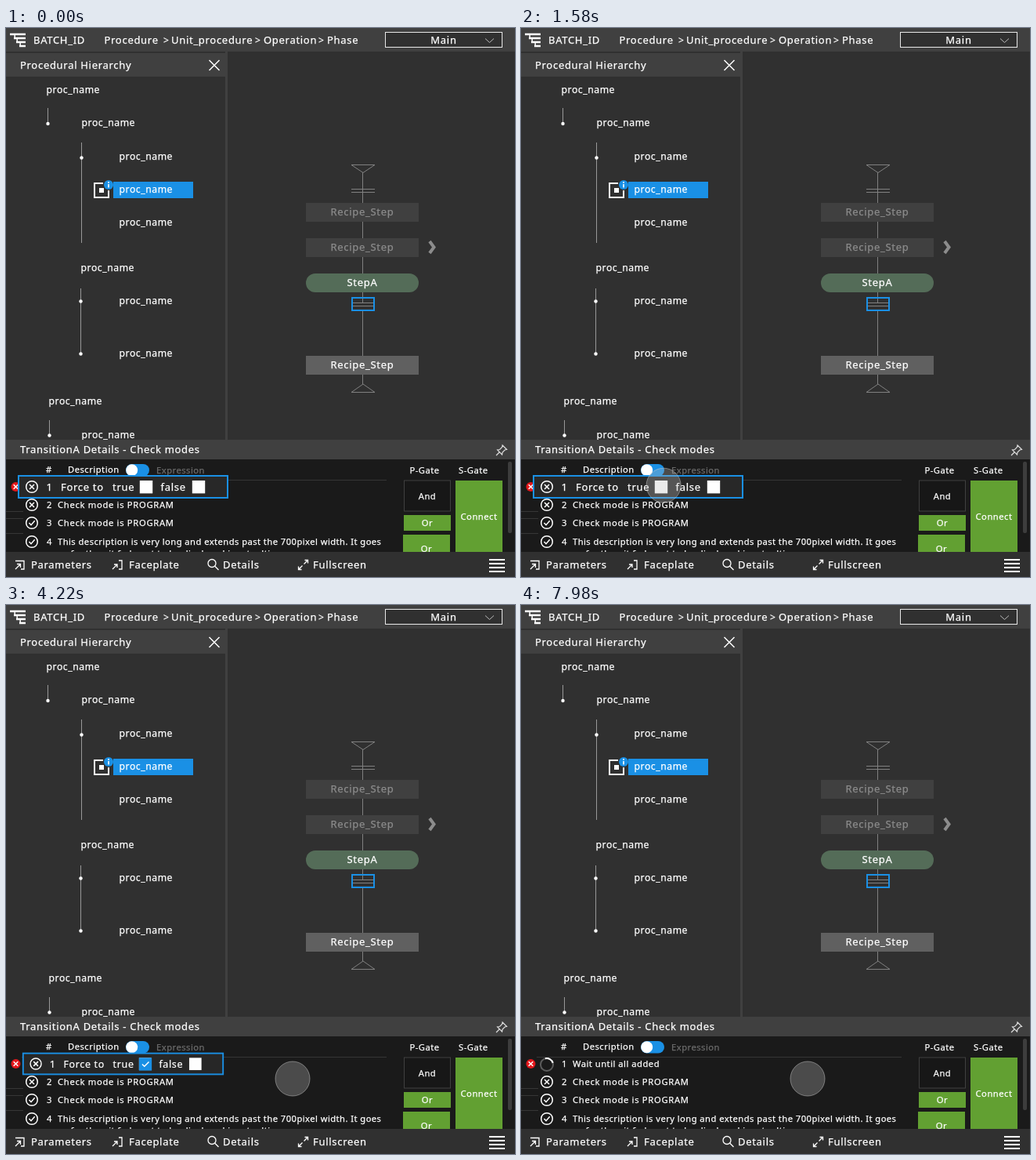
Recreate the animation shown at these times as an HTML page. Size 650 by 700 pixels, loop 8000 ms.

```html
<!DOCTYPE html>
<html lang="en">
<head>
<meta charset="utf-8">
<title>Batch transition details</title>
<style>
  html, body { margin: 0; width: 100%; height: 100%; overflow: hidden; background: #303030; }
  svg { display: block; }
  text {
    font-family: "Noto Sans", "Open Sans", sans-serif;
    font-size: 13px; letter-spacing: .7px;
    fill: #fff; stroke: #fff; stroke-width: .25px;
  }
  .tree text { font-size: 12.2px; letter-spacing: .55px; }
  .small text { font-size: 11.2px; letter-spacing: .5px; }
  .small .row { letter-spacing: .45px; }
  .mid { text-anchor: middle; }
  .dim { fill: #8b8b8b; stroke: #8b8b8b; }
  .faint { fill: #6c6c6c; stroke: #6c6c6c; }
  .line { fill: none; stroke: #fff; stroke-width: 1.5; }
  .flow { fill: none; stroke: #808080; stroke-width: 1; }
  .rule { fill: none; stroke: #363636; }
</style>
</head>
<body>
<svg width="650" height="700" viewBox="0 0 650 700">
  <defs>
    <g id="fail"><circle r="7.3" class="line"/><path d="M-3 -3L3 3M3 -3L-3 3" class="line"/></g>
    <g id="pass"><circle r="7.3" class="line"/><path d="M-3.5 0L-1 2.7L3.7 -2.7" class="line"/></g>
    <clipPath id="list"><path d="M0 550H650V668H0Z"/></clipPath>
    <clipPath id="body"><path d="M0 62H280V525H0Z"/></clipPath>
  </defs>

  <rect width="650" height="700" fill="#303030"/>

  <!-- top bar -->
  <rect width="650" height="30" fill="#404040"/>
  <path d="M5 8H25M10 13H25M13 18H25M17 23H25" stroke="#fff" stroke-width="2.6"/>
  <path d="M11.2 8V13M14.2 13V18M18.2 18V23" stroke="#fff" stroke-width="1.5"/>
  <text x="35" y="20">BATCH_ID</text>
  <text x="125.5" y="20">Procedure</text>
  <text x="201" y="19.5" style="font-size:12px">&gt;</text>
  <text x="211" y="20">Unit_procedure</text>
  <text x="318" y="19.5" style="font-size:12px">&gt;</text>
  <text x="329" y="20">Operation</text>
  <text x="399" y="19.5" style="font-size:12px">&gt;</text>
  <text x="410" y="20">Phase</text>
  <rect x="484.5" y="5.5" width="149" height="19" fill="#303030" stroke="#e8e8e8"/>
  <text x="559" y="20" class="mid">Main</text>
  <path d="M612 13.5L617.5 18.5L623 13.5" fill="none" stroke="#bbb"/>

  <!-- hierarchy -->
  <rect y="32" width="281" height="30" fill="#404040"/>
  <rect x="280" y="30" width="3" height="495" fill="#404040"/>
  <text x="18" y="52">Procedural Hierarchy</text>
  <path d="M259.5 41L272.5 54M272.5 41L259.5 54" class="line"/>
  <g class="tree" clip-path="url(#body)">
    <path d="M53.5 102V122M96.5 146V274M95.5 332V416M55.5 500V520" fill="none" stroke="#989898"/>
    <g id="dots" fill="#fff"></g>
    <rect x="137" y="196" width="102" height="21" fill="#1a90e5"/>
    <g id="names"></g>
  </g>
  <path d="M124 198H113V216H131V207" fill="none" stroke="#fff" stroke-width="2"/>
  <rect x="119" y="204" width="6" height="6" fill="#fff"/>
  <circle cx="131" cy="200" r="6" fill="#1a90e5"/>
  <path d="M131 199V203.5M131 196V197.7" stroke="#fff" stroke-width="1.6"/>

  <!-- recipe flow -->
  <path class="flow" d="M455.5 184V454M441 174.5H471L456 184.5ZM441 464.5H471L456 454ZM441 205.5H471M441 209.5H471"/>
  <rect x="383" y="223" width="144" height="24" fill="#404040"/>
  <rect x="383" y="268" width="144" height="24" fill="#404040"/>
  <rect x="383" y="313" width="144" height="24" rx="12" fill="#546c58"/>
  <rect x="383" y="418" width="144" height="24" fill="#606060"/>
  <text x="455" y="239" class="mid dim">Recipe_Step</text>
  <text x="455" y="284" class="mid dim">Recipe_Step</text>
  <text x="455" y="329" class="mid">StepA</text>
  <text x="455" y="434" class="mid">Recipe_Step</text>
  <path d="M541 272L546.5 279.5L541 287" fill="none" stroke="#8c8c8c" stroke-width="4"/>
  <rect x="442" y="344" width="28" height="16" fill="#303030" stroke="#1a90e5" stroke-width="2"/>
  <path class="flow" d="M443 350.5H469M443 354.5H469M455.5 345V350"/>

  <!-- details -->
  <rect y="525" width="650" height="25" fill="#404040"/>
  <rect y="550" width="650" height="118" fill="#1a1a1a"/>
  <text x="18" y="542">TransitionA Details - Check modes</text>
  <path d="M634 532L639.5 537.5L637 538L634 541L633.5 544L627.5 538L630.5 537.5L633.5 534.5ZM630 541L626 545" fill="none" stroke="#ddd" stroke-width="1.2"/>
  <g class="small" clip-path="url(#list)">
    <text x="51" y="567">#</text>
    <text x="79" y="567">Description</text>
    <rect x="153" y="556" width="30" height="15.5" rx="7.75" fill="#1a90e5"/>
    <circle cx="160.7" cy="563.7" r="7.5" fill="#fff"/>
    <text x="192" y="568" class="faint">Expression</text>
    <path class="rule" d="M20 576.5H486M0 616.5H22M0 625.5H22M0 644.5H22"/>
    <circle cx="12.5" cy="585" r="6" fill="#e3171b"/>
    <path d="M9.7 582.2L15.3 587.8M15.3 582.2L9.7 587.8" class="line"/>
    <g fill="none" stroke-width="2">
      <circle cx="33" cy="586" r="8" stroke="#5c5c5c"/>
      <path id="arc" d="M33 578A8 8 0 0 1 41 586" stroke="#fff"/>
    </g>
    <text x="52" y="589">1</text><text x="66" y="589">Wait until all added</text>
    <use href="#fail" x="33" y="608"/>
    <text x="52" y="612">2</text><text x="66" y="612" style="letter-spacing:.7px">Check mode is PROGRAM</text>
    <use href="#pass" x="33" y="631"/>
    <text x="52" y="635">3</text><text x="66" y="635" style="letter-spacing:.7px">Check mode is PROGRAM</text>
    <use href="#pass" x="33" y="655"/>
    <text x="52" y="659">4</text>
    <text x="66" y="659" class="row">This description is very long and extends past the 700pixel width. It goes</text>
    <text x="66" y="674" class="row">so far then it fade out to be displayed in a tooltip</text>

    <text x="515.5" y="568">P-Gate</text>
    <text x="578" y="568">S-Gate</text>
    <rect x="508.5" y="577" width="59" height="39" fill="#171717" stroke="#404040"/>
    <rect x="508" y="621" width="60" height="20" fill="#62a032"/>
    <rect x="507" y="646" width="60" height="24" fill="#62a032"/>
    <rect x="574" y="577" width="60" height="93" fill="#62a032"/>
    <text x="538" y="601" class="mid">And</text>
    <text x="538" y="635" class="mid">Or</text>
    <text x="537" y="668" class="mid">Or</text>
    <text x="604" y="627" class="mid">Connect</text>
    <rect x="641" y="553" width="5" height="91" rx="2" fill="#3d3d3d"/>
  </g>

  <!-- force popup -->
  <g id="popup">
    <rect x="16" y="571" width="267" height="28" fill="#282828" stroke="#1a90e5" stroke-width="2"/>
    <use href="#fail" x="33" y="585"/>
    <text x="51.5" y="590">1</text>
    <text x="70" y="590">Force to</text>
    <text x="136" y="590">true</text>
    <text x="197.5" y="590">false</text>
    <rect x="170.8" y="577" width="16.4" height="16.4" fill="#fff"/>
    <rect x="237.8" y="577" width="16.4" height="16.4" fill="#fff"/>
    <g id="tick">
      <rect x="170.8" y="577" width="17" height="17" fill="#1a90e5"/>
      <path d="M175 585.5L178 588.5L184 582.5" class="line"/>
    </g>
  </g>

  <!-- footer -->
  <rect y="668" width="650" height="32" fill="#303030"/>
  <g fill="none" stroke="#fff" stroke-width="1.3">
    <path d="M12 679.5H23V690H19M12 690L18.5 683.5M14 683.5H18.5V688"/>
    <path d="M144 679H148V690H144M136 690L142 684M138 684H142V688"/>
    <circle cx="263" cy="682.5" r="5"/><path d="M266.7 686.2L271.5 691"/>
    <path d="M380.5 683.5L385 679M381.5 678.5H385.5V682.5M378.5 685.5L374 690M373.5 686.5V690.5H377.5"/>
  </g>
  <text x="32" y="688.5">Parameters</text>
  <text x="157" y="688.5">Faceplate</text>
  <text x="277" y="688.5">Details</text>
  <text x="392" y="688.5">Fullscreen</text>
  <path d="M617 678H637M617 683H637M617 688H637M617 693H637" stroke="#fff" stroke-width="2"/>

  <circle id="cursor" r="22" stroke="#c8c8c8" stroke-opacity=".5"/>
</svg>
<script>
  const $ = id => document.getElementById(id);
  const LOOP = 8000;

  $('names').innerHTML = [
    [51.5, 83], [96.5, 125], [144.5, 168], [144.5, 210], [144.5, 252],
    [95.5, 310], [144.5, 352], [144.5, 419], [54.5, 480], [96.5, 523]
  ].map(([x, y]) => `<text x="${x}" y="${y}">proc_name</text>`).join('');

  $('dots').innerHTML = [
    [53.5, 122], [96.5, 165.5], [95.5, 348.5], [95.5, 415.5], [55.5, 519.5]
  ].map(([x, y]) => `<circle cx="${x}" cy="${y}" r="2.2"/>`).join('');

  const span = (t, from, to) => Math.min(1, Math.max(0, (t - from) / (to - from)));
  const smooth = p => p * p * (3 - 2 * p);
  const soft = p => (p + smooth(p)) / 2;
  const inOut = p => p < .5 ? 2 * p * p : 1 - 2 * (1 - p) ** 2;

  function cursorAt(t) {
    if (t < 1300) {
      const left = 1 - span(t, 480, 1300);
      return [197 + 493 * left ** 2.3, 575 - 456 * left ** 1.9];
    }
    if (t < 3360) {
      const e = soft(span(t, 1300, 1700));
      return [197 - 20 * e, 575 + 11 * e];
    }
    const e = soft(span(t, 3360, 3940));
    return [177 + 189 * e, 586 + 18 * e * e];
  }

  function draw(t) {
    const [x, y] = cursorAt(t);
    const pressed = (t >= 2040 && t < 2180) || (t >= 4080 && t < 4220);
    const cursor = $('cursor');
    cursor.setAttribute('cx', x);
    cursor.setAttribute('cy', y);
    cursor.setAttribute('fill', `rgba(190,190,190,${pressed ? .5 : .3})`);
    cursor.setAttribute('visibility', t < 500 ? 'hidden' : 'visible');

    $('tick').setAttribute('opacity', smooth(span(t, 2160, 2500)));

    const out = span(t, 4200, 4520), size = 1 - out ** 1.15;
    const popup = $('popup');
    popup.setAttribute('transform', `translate(149.5 585) scale(${size}) translate(-149.5 -585)`);
    popup.setAttribute('opacity', 1 - out * out);
    popup.setAttribute('visibility', out < 1 ? 'visible' : 'hidden');

    // one eased turn every 1.5 s, at rest at 5200 and 6700
    const turn = inOut(((t + 800) % 1500) / 1500);
    $('arc').setAttribute('transform', `rotate(${360 * turn} 33 586)`);
  }

  const start = performance.now();
  function tick() {
    draw((performance.now() - start) % LOOP);
    requestAnimationFrame(tick);
  }
  tick();
</script>
</body>
</html>
```
